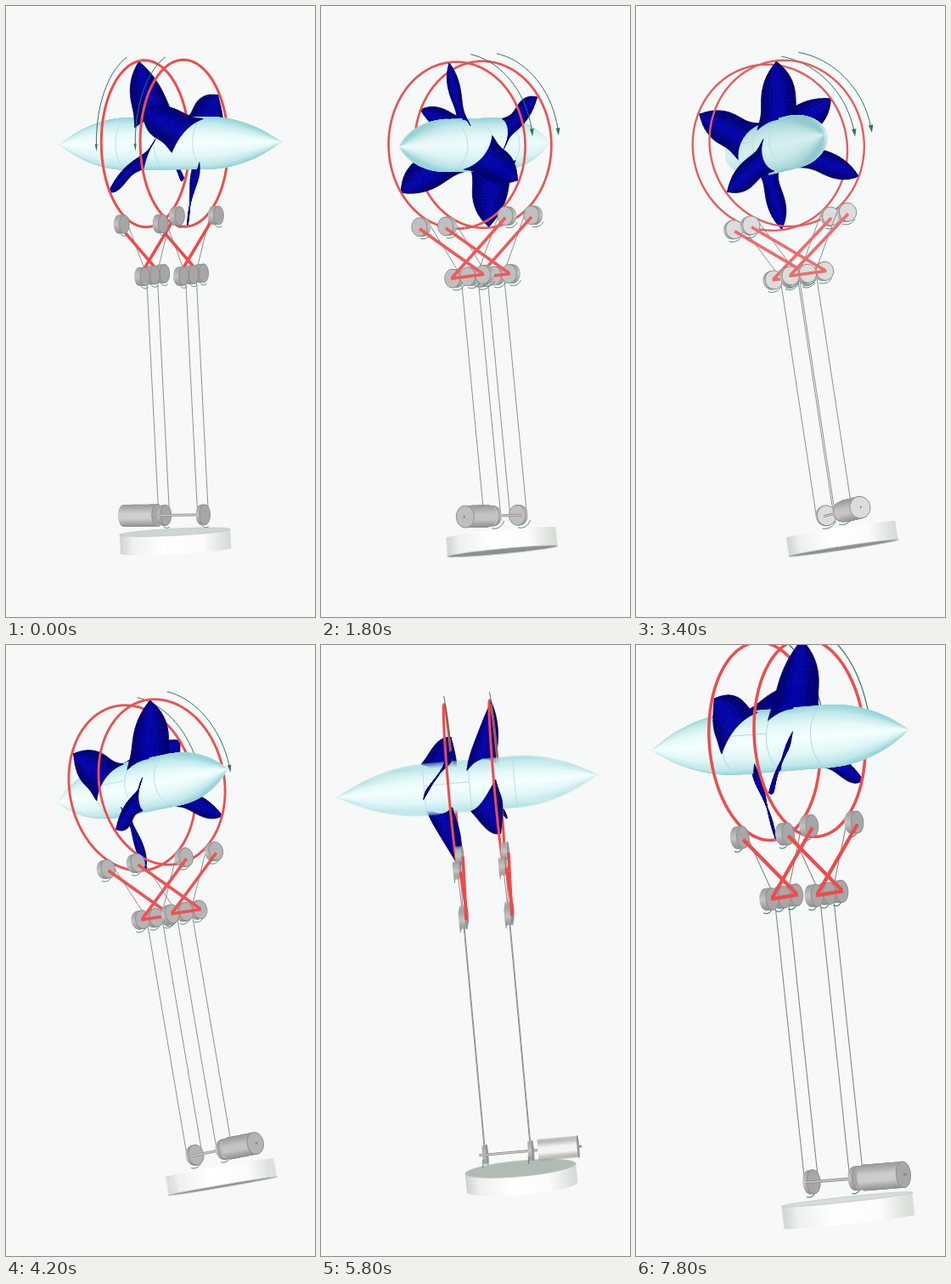
Write an HTML page with a canvas that moves like this. It is 364 px wide and 718 px high and loops after 8000 ms.

```html
<!DOCTYPE html>
<html lang="en">
<head>
<meta charset="utf-8">
<title>Twin rotor turbine</title>
<style>
  html, body { margin: 0; width: 100%; height: 100%; overflow: hidden; background: #f7f8f8; }
  canvas { display: block; }
</style>
</head>
<body>
<canvas id="stage" width="364" height="718"></canvas>
<script>
const ctx = document.getElementById('stage').getContext('2d');
const STEP = 200, STEPS = 40, RAD = Math.PI / 180;

// Camera path: step, yaw, elevation, roll, zoom, rotor centre x, y
const path = [
  [0, -32, 3.5, 2.9, 1, 187, 161.5],
  [6, 22.6, -2.4, 3.66, 1, 181, 163.5],
  [12, 88, -3, 7.3, 1, 170, 163],
  [21, 131.4, -1.3, 9.7, 1, 166, 164.5],
  [24, 163, 9, 7.8, 1, 174, 167],
  [25, 166, 12, 7.3, 1, 175.5, 167.5],
  [33, 190, 4.3, 3.3, 1, 185, 162.5],
  [36, 168, 3.3, 4.7, 1, 177, 166],
  [39, 146, 2.3, 6.1, 1.19, 178, 111]
];

const RING_X = 27, RING_R = 98, HULL_R = 31;
const HULL_STOPS = [[0, 0], [.12, .5], [.3, .85], [.5, 1], [.75, .8], [.92, .45], [1, 0]];
const BASE_STOPS = [[0, '#cdd3cd'], [.12, '#eef1ee'], [.4, '#ffffff'], [.75, '#fafbfa'], [1, '#d3d9d3']];
const DISC_EDGE = [[0, '#9c9c9c'], [.5, '#c4c4c4'], [1, '#8e8e8e']];
const RED = [240, 72, 72], GREEN = '#2f7662';

let cam;

const lerp = (a, b, t) => a + (b - a) * t;
const blend = (a, b, t) => a.map((v, i) => Math.round(lerp(v, b[i], t)));
const mix = (a, b, t) => `rgb(${blend(a, b, t)})`;

function setCamera(step) {
  let i = 0;
  while (i < path.length - 2 && step > path[i + 1][0]) i++;
  const a = path[i], b = path[i + 1], t = (step - a[0]) / (b[0] - a[0]);
  const [yaw, elev, roll, k, ox, oy] = a.slice(1).map((v, j) => lerp(v, b[j + 1], t));
  cam = {
    k, ox, oy,
    c: Math.cos(yaw * RAD), s: Math.sin(yaw * RAD),
    ce: Math.cos(elev * RAD), se: Math.sin(elev * RAD),
    cr: Math.cos(roll * RAD), sr: Math.sin(roll * RAD)
  };
  cam.frontSign = Math.sign(cam.c);
  cam.endOn = Math.abs(cam.s) ** 6;
}

// Returns screen x, screen y and depth towards the viewer
function project(X, Y, Z) {
  const { k, ox, oy, c, s, ce, se, cr, sr } = cam;
  const x = X * c + Z * s, d = Z * c - X * s, y = d * se - Y * ce;
  return [ox + k * (x * cr + y * sr), oy + k * (y * cr - x * sr), d * ce + Y * se];
}

function trace(points) {
  ctx.beginPath();
  points.forEach(p => ctx.lineTo(...project(...p).slice(0, 2)));
}

function line(points, color, width) {
  trace(points);
  ctx.strokeStyle = color;
  ctx.lineWidth = width * cam.k;
  ctx.stroke();
}

function arc(X, Y, Z, r, from, to) {
  const n = Math.ceil(Math.abs(to - from) / 4);
  return Array.from({ length: n + 1 }, (_, i) => {
    const a = lerp(from, to, i / n) * RAD;
    return [X, Y + r * Math.cos(a), Z + r * Math.sin(a)];
  });
}

// Body of revolution, painted as circular slices from far to near
function solid(at, from, to, radius, stops, cap, capStroke) {
  const p0 = project(...at(0)), p1 = project(...at(1)), k = cam.k;
  const dx = (p1[0] - p0[0]) / k, dy = (p1[1] - p0[1]) / k, depth = p1[2] - p0[2];
  const sign = dx < -.3 ? -1 : 1;
  const angle = Math.atan2(dy * sign, dx * sign);
  if (depth < 0) [from, to] = [to, from];
  const n = Math.ceil(Math.abs(to - from));
  for (let i = 0; i <= n; i++) {
    const pos = lerp(from, to, i / n), r = Math.max(.2, radius(pos)) * k;
    const [x, y] = project(...at(pos));
    ctx.save();
    ctx.translate(x, y);
    ctx.rotate(angle);
    const fill = ctx.createLinearGradient(0, -r, 0, r);
    stops.forEach(s => fill.addColorStop(...s));
    ctx.fillStyle = i === n && cap ? cap : fill;
    ctx.beginPath();
    ctx.ellipse(0, 0, Math.max(r * Math.abs(depth), .9), r, 0, 0, 7);
    ctx.fill();
    if (i === n && capStroke) {
      ctx.strokeStyle = capStroke;
      ctx.lineWidth = .8;
      ctx.stroke();
    }
    ctx.restore();
  }
}

function cylinderX(x0, x1, Y, Z, r, stops) {
  const face = mix([164, 164, 164], [252, 252, 252], cam.endOn);
  solid(X => [X, Y, Z], x0, x1, () => r, stops, face, '#858585');
}

const byDepth = list => list.sort((a, b) => project(...a)[2] - project(...b)[2]);
const farToNear = () => cam.s > 0 ? [RING_X, -RING_X] : [-RING_X, RING_X];
const quad = (a, b, c, t) => (1 - t) ** 2 * a + 2 * t * (1 - t) * b + t * t * c;

// Point on a blade: t runs from root to tip, u from leading to trailing edge
function bladePoint(X0, deg, t, u) {
  const r = lerp(30, 97, t);
  const spread = 20 * (1 - t * t) + 26 * (1 - t) ** 10;
  const a = (deg + spread * (2 * u - 1)) * RAD;
  const x = lerp(quad(33, 19, -2, t), quad(0, -12, -2, t), u);
  return [X0 + x, r * Math.cos(a), r * Math.sin(a)];
}

// Only the cells lying before or behind the hull axis are painted
function blade(X0, deg, front) {
  const rows = 18, cols = 8;
  const point = (i, j) => bladePoint(X0, deg, (i / rows) ** 1.4, j / cols);
  ctx.lineWidth = .7;
  for (let i = 0; i < rows; i++) {
    for (let j = 0; j < cols; j++) {
      const cell = [point(i, j), point(i + 1, j), point(i + 1, j + 1), point(i, j + 1)];
      const z = cell.reduce((sum, p) => sum + p[2], 0);
      const inFront = Math.abs(cam.c) > .2 && z * cam.frontSign > 0;
      if (inFront !== front) continue;
      trace(cell);
      ctx.closePath();
      ctx.fillStyle = ctx.strokeStyle =
        mix([0, 0, 112], [4, 4, 170], Math.sin((j + .5) / cols * Math.PI) ** 2);
      ctx.fill();
      ctx.stroke();
    }
  }
}

function turnArrow(X) {
  line(arc(X, 0, 0, 109, 17, 86), GREEN, 1);
  trace([[X, -1, 109], [X, 8, 106], [X, 8, 112]]);
  ctx.fillStyle = GREEN;
  ctx.fill();
}

function rotorHalf(front) {
  const side = front ? cam.frontSign : -cam.frontSign;
  const color = mix([236, 76, 76], [228, 100, 100], cam.endOn);
  for (const X of farToNear()) {
    const first = X < 0 ? 1 : 61;
    for (const deg of [first, first + 120, first + 240]) blade(X, deg, front);
    line(arc(X, 0, 0, RING_R, 0, 180 * side), color, lerp(3, 2, cam.endOn));
    if (side > 0) turnArrow(X);
  }
}

function hullRadius(X) {
  const u = X < -49 ? (-49 - X) / 97 : X > 58 ? (X - 58) / 104 : 0;
  return HULL_R * (1 - u * u);
}

function hull() {
  const light = Math.min(1, Math.abs(cam.c) * 1.6);
  const dark = blend([134, 180, 184], [148, 212, 216], light);
  const bright = blend([168, 214, 216], [244, 255, 255], light);
  solid(X => [X, 0, 0], -146, 162, hullRadius, HULL_STOPS.map(([o, t]) => [o, mix(dark, bright, t)]));
  const seam = '#b0dcdf', mid = cam.c > 0 ? 90 : 270;
  if (Math.abs(cam.c) > .2) {
    for (const X of [-49, 4, 58]) line(arc(X, 0, 0, HULL_R, mid - 88, mid + 88), seam, .9);
    if (cam.c < 0) line([[4, 9, -30], [58, 9, -30]], seam, .9);
  } else {
    line([[-146, 0, 0], [-49, HULL_R, 0]], '#c4e4e6', .9);
  }
}

function struts(X) {
  const color = mix(RED, [240, 128, 128], cam.endOn);
  for (const side of [-1, 1]) line([[X, -92, 62 * side], [X, -154, -22 * side]], color, 3.6);
  line([[X, -155, -24], [X, -155, 24]], color, 3.6);
}

function pulleys(X) {
  for (const side of [-1, 1]) {
    line([[X, -150, 12 * side], [X, -438, 12 * side]], '#858585', .9);
    line([[X, -86, 51 * side], [X, -148, 15 * side]], '#858585', .9);
  }
  const strutsInFront = cam.s > 0;
  if (!strutsInFront) struts(X - 3);
  const spots = [[X, -90, -62], [X, -90, 62], [X, -155, -22], [X, -155, 0], [X, -155, 22]];
  for (const [, Y, Z] of byDepth(spots)) {
    line(arc(X + 4, Y, Z, 14, 130, 205), GREEN, .9);
    cylinderX(X - 4, X + 4, Y, Z, 11, DISC_EDGE);
  }
  if (strutsInFront) struts(X - 4);
}

function drive() {
  const Y = -438;
  const shine = mix([246, 246, 246], [196, 196, 196], Math.min(1, Math.abs(cam.s) * 1.5));
  const metal = [[0, '#979797'], [.4, shine], [.65, shine], [1, '#8d8d8d']];
  const wheel = X => {
    line(arc(X + 4, Y, 0, 15, 120, 200), GREEN, .9);
    cylinderX(X - 2.5, X + 2.5, Y, 0, 12, DISC_EDGE);
  };
  const parts = [
    () => {
      cylinderX(-83, -36, Y, 0, 13, metal);
      if (cam.s > -.2) line([[-87, Y, 0], [-83, Y, 0]], '#8a8a8a', 2.5);
    },
    () => wheel(-RING_X),
    () => {
      line([[-36, Y, 0], [34, Y, 0]], '#8f8f8f', 3);
      line([[-36, Y, 0], [34, Y, 0]], '#c9c9c9', 1.4);
    },
    () => wheel(RING_X)
  ];
  if (cam.s > 0) parts.reverse();
  parts.forEach(draw => draw());
}

function base() {
  const tilt = Math.min(1, Math.abs(cam.se) * 4.5);
  const cap = cam.se > 0 ? mix([228, 233, 229], [150, 160, 152], tilt) : '#8b918c';
  solid(Y => [-13, Y, 0], -480, -458, () => 65.5, BASE_STOPS, cap, '#c3cac4');
}

function render(step) {
  setCamera(step);
  ctx.fillStyle = '#f7f8f8';
  ctx.fillRect(0, 0, 364, 718);
  ctx.lineJoin = 'round';
  rotorHalf(false);
  hull();
  rotorHalf(true);
  base();
  farToNear().forEach(pulleys);
  drive();
}

let shown = -1;
function tick() {
  const step = Math.floor(performance.now() / STEP) % STEPS;
  if (step !== shown) render(shown = step);
  requestAnimationFrame(tick);
}
tick();
</script>
</body>
</html>
```
